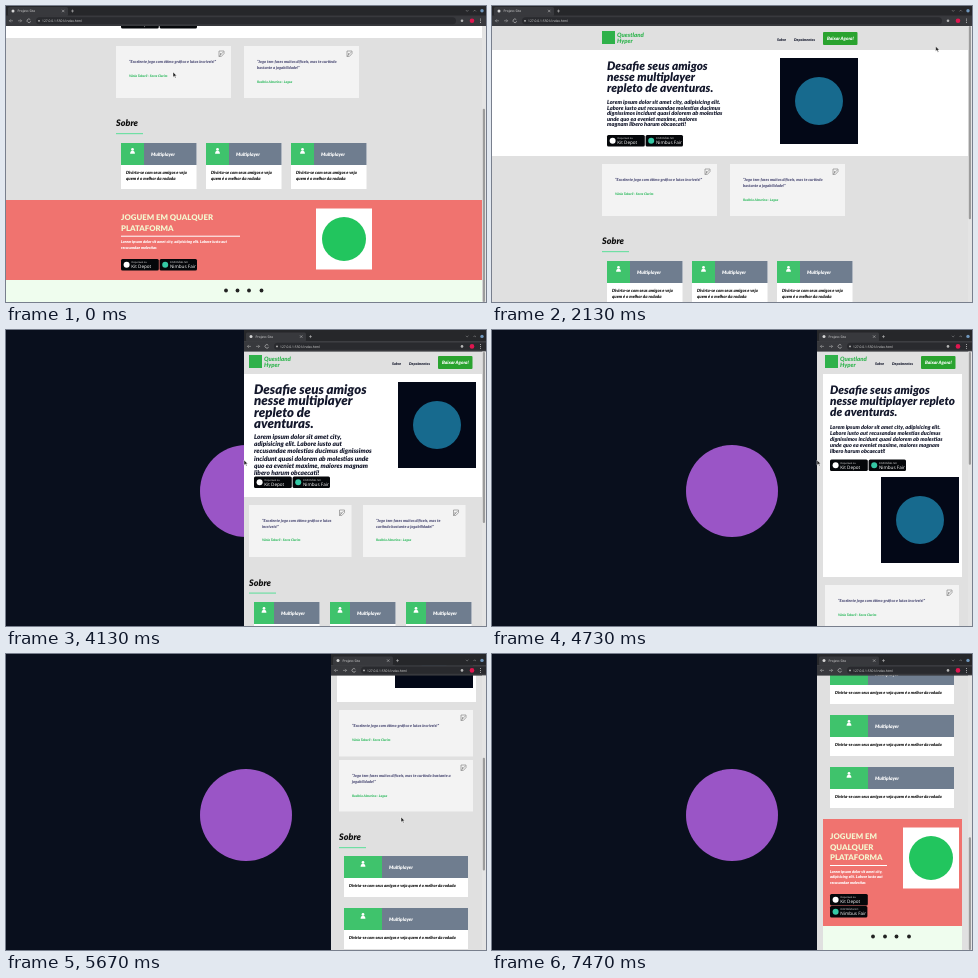
These frames come from a looping animation (480x296 px, 7.67 s). An HTML page:

```html
<!DOCTYPE html>
<html lang="pt-BR">
<head>
<meta charset="utf-8">
<title>Projeto Site</title>
<style>
  html, body { margin: 0; width: 100%; height: 100%; overflow: hidden; background: #090f1d; }
  svg { display: block; width: 480px; height: 296px; }
  text { font: italic 900 5px Lato, "Open Sans", sans-serif; text-rendering: geometricPrecision; white-space: pre; }
  .ui { font: 400 3.2px "Open Sans", Roboto, sans-serif; }
  .upright { font-style: normal; }
</style>
</head>
<body>
<svg id="stage" viewBox="0 0 480 296"></svg>
<script>
const LOOP = 7670, LAST = 112;
const GRAY = '#e0e0e0', GREEN = '#3fc36c', SALMON = '#f0736f', SLATE = '#6f7d8f', INK = '#14182c';

const box = (x, y, w, h, fill, r = 0) =>
  `<rect x="${x}" y="${y}" width="${w}" height="${h}" rx="${r}" fill="${fill}"/>`;
const dot = (x, y, r, fill) => `<circle cx="${x}" cy="${y}" r="${r}" fill="${fill}"/>`;
const line = (d, color, width = .6) =>
  `<path d="${d}" fill="none" stroke="${color}" stroke-width="${width}"/>`;
const text = (x, y, size, fill, str, cls = '') =>
  `<text x="${x}" y="${y}" fill="${fill}" class="${cls}" style="font-size:${size}px">${str}</text>`;
const lines = (x, y, step, size, fill, list, cls) =>
  list.map((s, i) => text(x, y + i * step, size, fill, s, cls)).join('');

const badge = (x, y, w, color, small, name) =>
  box(x, y, w, 11.6, '#05070a', 1.5) + dot(x + 5.6, y + 5.8, 3, color) +
  text(x + 10.5, y + 4.1, 2.4, '#fff', small, 'ui') +
  text(x + 10.3, y + 9.2, 4.6, '#fff', name, 'ui');
const badges = (x, y, stacked) =>
  badge(x, y, 37.8, '#fff', 'Disponível na', 'Kit Depot') +
  badge(stacked ? x : x + 38.6, stacked ? y + 12 : y, 37.4, '#35c9a5', 'DISPONÍVEL NO', 'Nimbus Fair');

function header(logoX, navX, linkX, btnX) {
  return box(logoX, 25, 13, 13, '#2fb14a') +
    lines(logoX + 15, 31.2, 6, 6, '#35b653', ['Questland', 'Hyper']) +
    text(navX, 34.5, 3.7, INK, 'Sobre') + text(linkX, 34.5, 3.7, INK, 'Depoimentos') +
    box(btnX, 26, 34.5, 13, '#2aa32f', 1) + text(btnX + 4, 34.3, 4.6, '#fff', 'Baixar Agora!');
}

function hero(o) {
  return box(o.left, 44, o.width, o.bottom - 44, '#fff') +
    lines(o.x, o.headY, o.headStep, o.headSize, INK, o.head) +
    lines(o.x, o.bodyY, o.bodyStep, o.bodySize, INK, o.body) +
    badges(o.x, o.badgeY) +
    box(o.imgX, o.imgY, 78, 86, '#030817') + dot(o.imgX + 39, o.imgY + 43, 24, '#176a8e');
}

function quote(x, y, w, h, list, name, nameY) {
  const qx = x + w - 12, qy = y + 5;
  return box(x, y, w, h, '#f3f3f3') +
    line(`M${qx} ${qy}h5v2.6l-2.6 2.8h-2.4zM${qx} ${qy + 5.6}l4-4.4M${qx + 1.5} ${qy + 2}v2`, '#777', .6) +
    lines(x + 13, y + 17.3, 6, 4, '#55557c', list) +
    text(x + 13, y + nameY, 3.3, '#33bb62', name);
}
const PRAISE = ['“Excelente jogo com ótimo gráfico e lutas', 'incríveis!”'];
const REVIEW = ['“Jogo tem fases muitos difíceis, mas te curtindo', 'bastante a jogabilidade!”'];
const FAN_A = 'Vânia Taboril - Serra Clarim', FAN_B = 'Rodério Almerino - Lagoa';

const about = (x, y) => text(x, y, 9, '#101010', 'Sobre') + box(x, y + 7, 27, 1.2, '#70dfa4');

function card(x, y, w, green, bodyH, list) {
  const c = x + green / 2;
  return box(x, y, w, 22 + bodyH, '#fff') + box(x, y, w, 22, SLATE) + box(x, y, green, 22, GREEN) +
    dot(c, y + 6.4, 1.4, '#fff') +
    `<path d="M${c - 2.4} ${y + 10.8}q0-3 2.4-3t2.4 3z" fill="#fff"/>` +
    text(x + green + 7, y + 12.6, 4.8, '#fff', 'Multiplayer') +
    lines(x + 5, y + 31, 6, list.length > 1 ? 4.3 : 4.13, '#111', list);
}
const FUN = ['Divirta-se com seus amigos e veja', 'quem é o melhor da rodada'];

function promo(o) {
  return box(o.left, o.y, o.width, o.h, SALMON) +
    lines(o.x, o.y + 20, 10.7, 7.8, '#f4f6cf', o.head, 'upright') +
    box(o.x, o.ruleY, o.ruleW, 1, '#fff') +
    lines(o.x, o.ruleY + 7.5, 5.6, 3.9, '#fff', o.body) +
    badges(o.x, o.badgeY, o.stacked) +
    box(o.imgX, o.y + 8.5, 56, 61, '#fff') + dot(o.imgX + 28, o.y + 39, 22, '#22c55e');
}
const footer = (x, y, w, icons) =>
  box(x, y, w, 24, '#effdee') + icons.map(i => dot(i, y + 10.5, 1.9, '#222')).join('');

const wide = header(110, 285, 302, 331) + hero({
  left: 0, width: 480, bottom: 150, x: 115, headY: 63.5, headStep: 11, headSize: 11.8,
  head: ['Desafie seus amigos', 'nesse multiplayer', 'repleto de aventuras.'],
  bodyY: 98.3, bodyStep: 5.5, bodySize: 5.65,
  body: ['Lorem ipsum dolor sit amet city, adipisicing elit.', 'Labore iusto aut recusandae molestias ducimus',
    'dignissimos incidunt quasi dolorem ab molestias', 'unde quo ea eveniet maxime, maiores', 'magnam libero harum obcaecati!'],
  badgeY: 129, imgX: 288, imgY: 52
}) +
  quote(110, 158, 115, 52, [PRAISE.join(' ')], FAN_A, 31.3) +
  quote(238, 158, 115, 52, REVIEW, FAN_B, 36.5) +
  about(110, 238) + [115, 200, 285].map(x => card(x, 255, 75.5, 23, 24, FUN)).join('') +
  promo({
    left: 0, width: 480, y: 312, h: 80, x: 115, head: ['JOGUEM EM QUALQUER', 'PLATAFORMA'],
    ruleY: 347.7, ruleW: 119, badgeY: 371, imgX: 310,
    body: ['Lorem ipsum dolor sit amet city, adipisicing elit. Labore iusto aut', 'recusandae molestias']
  }) + footer(0, 392, 480, [220, 231.5, 243, 255.5]);

const medium = header(5, 148, 165, 194) + hero({
  left: 0, width: 480, bottom: 167, x: 10, headY: 64, headStep: 11.4, headSize: 13.2,
  head: ['Desafie seus amigos', 'nesse multiplayer', 'repleto de', 'aventuras.'],
  bodyY: 109, bodyStep: 7.2, bodySize: 6.5,
  body: ['Lorem ipsum dolor sit amet city,', 'adipisicing elit. Labore iusto aut', 'recusandae molestias ducimus dignissimos',
    'incidunt quasi dolorem ab molestias unde', 'quo ea eveniet maxime, maiores magnam', 'libero harum obcaecati!'],
  badgeY: 146.4, imgX: 154, imgY: 52
}) +
  quote(5, 175, 102.5, 52, PRAISE, FAN_A, 36.3) +
  quote(119, 175, 102.5, 52, ['“Jogo tem fases muitos difíceis, mas te', 'curtindo bastante a jogabilidade!”'], FAN_B, 36.3) +
  about(5, 255.5) + [10, 86, 162].map(x => card(x, 272, 65.5, 20, 24, FUN)).join('');

const narrow = header(8, 58, 75, 104) + hero({
  left: 6, width: 139, bottom: 247, x: 13, headY: 63.7, headStep: 11.2, headSize: 11.7,
  head: ['Desafie seus amigos', 'nesse multiplayer repleto', 'de aventuras.'],
  bodyY: 98.8, bodyStep: 6, bodySize: 5.5,
  body: ['Lorem ipsum dolor sit amet city, adipisicing elit.', 'Labore iusto aut recusandae molestias ducimus',
    'dignissimos incidunt quasi dolorem ab molestias', 'unde quo ea eveniet maxime, maiores magnam', 'libero harum obcaecati!'],
  badgeY: 129.5, imgX: 64, imgY: 147
}) +
  quote(8, 255, 134, 46.5, [PRAISE.join(' ')], FAN_A, 31.3) +
  quote(8, 305, 134, 51.5, ['“Jogo tem fases muitos difíceis, mas te curtindo bastante a', 'jogabilidade!”'], FAN_B, 36.5) +
  about(8, 385) + [401, 453, 505].map(y => card(13, y, 124, 38, 19, [FUN.join(' ')])).join('') +
  promo({
    left: 6, width: 139, y: 557, h: 107, x: 13, head: ['JOGUEM EM', 'QUALQUER', 'PLATAFORMA'],
    ruleY: 603, ruleW: 57, badgeY: 632, stacked: true, imgX: 86,
    body: ['Lorem ipsum dolor sit amet city,', 'adipisicing elit. Labore iusto aut', 'recusandae molestias']
  }) + footer(6, 664, 139, [56, 68, 79.5, 92]);

const chromeLeft =
  box(0, -2, 480, 12, '#26272a') + box(2, 1, 60, 9, '#38393d', 1.5) + box(0, 9.5, 480, 10.5, '#38393d') +
  box(30, 11.2, 420, 7, '#292a2e', 3.5) +
  dot(7, 5, 1.5, '#d5d5d5') + text(11.5, 6.2, 3.3, '#e5e5e5', 'Projeto Site', 'ui') +
  line('M56 3.8l2.4 2.4m0-2.4l-2.4 2.4M65 5h3m-1.5-1.5v3', '#ccc', .5) +
  line('M7 14.8h-3.6m1.5-1.5l-1.5 1.5 1.5 1.5M12 14.8h3.6m-1.5-1.5l1.5 1.5-1.5 1.5', '#bbb', .5) +
  line('M24.3 13.7a1.8 1.8 0 1 0 .3 1.5', '#ccc', .6) + dot(33, 14.8, .9, '#bbb') +
  text(36, 16, 3.3, '#dedede', '127.0.0.1:5501/index.html', 'ui');
const chromeRight =
  line('M460 4.2l1.2 1.2 1.2-1.2M467.5 5.4l1.2-1.2 1.2 1.2', '#aaa', .5) + dot(476, 4.8, 1.7, '#6f97bd') +
  dot(456, 14.8, 1.3, '#b5b5b5') + dot(466, 14.8, 2.3, '#e0164f') +
  [13, 14.8, 16.6].map(y => dot(474.5, y, .5, '#ccc')).join('');

document.getElementById('stage').innerHTML =
  box(0, 0, 480, 296, '#090f1d') + dot(240, 161, 46, '#9a55c6') +
  `<g id="win">${box(0, 0, 480, 296, GRAY)}
    <g id="wide">${wide}</g><g id="medium">${medium}</g><g id="narrow">${narrow}</g>
    <g id="left">${chromeLeft}</g></g>
  <g id="right">${box(476, 20, 4, 276, '#e4e4e4')}${chromeRight}</g>
  <rect id="thumb" x="476.8" width="2.2" rx="1" fill="#9c9c9c"/>
  <path id="cursor" d="M0 0v5.2l1.3-1.1 .9 1.9 .9-.4-.9-1.8h1.6z" fill="#222" stroke="#fff" stroke-width=".5"/>`;

const $ = id => document.getElementById(id);
const move = (id, x, y) => $(id).setAttribute('transform', `translate(${x} ${y})`);

// Rows are [time, value...], joined by straight segments.
const SCROLL_WIDE = [[930, 118], [1400, 0]];
const SCROLL_NARROW = [[4930, 0], [5600, 199], [5730, 199], [6400, 368], [6600, 368], [7100, 392]];
const EDGE = [[4130, 238], [4670, 325]];
const POINTER = [[0, 167, 66], [130, 167, 66], [800, 380, 159], [1670, 380, 159], [2270, 463, 4], [2730, 463, 4],
  [3140, 232, 112], [4130, 238, 130], [4670, 325, 130], [4740, 325, 130], [4930, 395, 163], [5730, 395, 163],
  [6400, 394, 165], [6600, 394, 165], [7130, -10, 165]];

function at(rows, t) {
  if (t <= rows[0][0]) return rows[0].slice(1);
  const i = rows.findIndex(r => r[0] > t);
  if (i < 0) return rows[rows.length - 1].slice(1);
  const a = rows[i - 1], b = rows[i], k = (t - a[0]) / (b[0] - a[0]);
  return a.slice(1).map((v, j) => v + (b[j + 1] - v) * k);
}

const stepTime = n => Math.round(n * 20 / 3) * 10;
function snap(t) {
  let n = Math.min(LAST, Math.floor((t + 5) * 3 / 200));
  if (stepTime(n) > t) n--;
  return stepTime(Math.max(0, n));
}

function draw(t) {
  const full = t < 2730;
  const x = full ? 0 : at(EDGE, t)[0];
  const mode = full ? 'wide' : x < 285 ? 'medium' : 'narrow';
  const scroll = full ? at(SCROLL_WIDE, t)[0] : at(SCROLL_NARROW, t)[0];
  const top = full ? 20 : 22, view = 296 - top;
  const range = { wide: 118, medium: 165, narrow: 392 }[mode];
  const ratio = view / (view + range);
  const drop = full ? 0 : 1.6;

  for (const id of ['wide', 'medium', 'narrow']) $(id).style.display = id === mode ? '' : 'none';
  move('win', x, 0);
  move(mode, mode === 'narrow' ? (325 - x) / 2 : 0, -scroll);
  move('left', 0, drop);
  move('right', 0, drop);
  $('thumb').setAttribute('y', top + scroll * ratio);
  $('thumb').setAttribute('height', view * ratio);
  move('cursor', ...at(POINTER, t));
}

function tick() {
  draw(snap(performance.now() % LOOP));
  requestAnimationFrame(tick);
}
tick();
</script>
</body>
</html>
```
